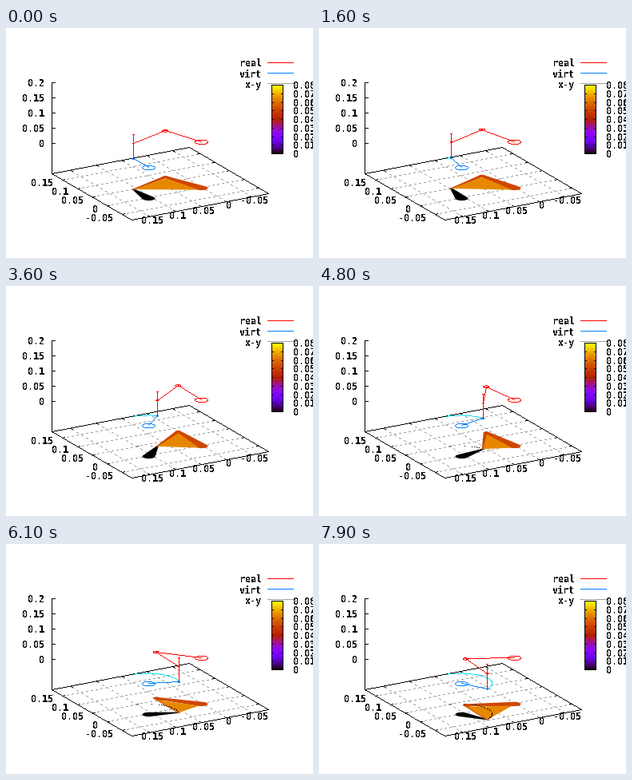
Animation, 384 px wide and 288 px high, one loop 8 s. Source, as a matplotlib script:

```python
import numpy as np
import matplotlib.pyplot as plt
from matplotlib.animation import FuncAnimation
from matplotlib.patches import PathPatch, Polygon
from matplotlib.path import Path

W, H, DPI = 384, 288, 100
PX = 72 / DPI
FRAMES, STEP = 80, 100
SQ = 2.985            # foreshortening of the ground plane
LINK = 61.2           # arm link length in px
RED, BLUE, CYAN = "#ff0000", "#0080ff", "#00e6f0"
ORANGE, RUST, GRAY = "#e78700", "#ce4600", "#a0a0a0"

plt.rcParams.update({
    "font.family": "DejaVu Sans Mono", "font.weight": "bold",
    "font.size": 11.6 * PX, "text.antialiased": False,
    "toolbar": "None",
})

fig = plt.figure(figsize=(W / DPI, H / DPI), dpi=DPI, facecolor="white")
ax = fig.add_axes([0, 0, 1, 1])
ax.axis("off")

SQUARE = np.array([(0, 0), (1, 0), (1, 1), (0, 1), (0, 0)], float)
SQUARE_CODES = [Path.MOVETO] + [Path.LINETO] * 3 + [Path.CLOSEPOLY]


def trace(pts):
    """Pixels along a polyline, one per step of the longer axis."""
    pts = np.rint(np.asarray(pts, float))
    out = [pts[:1]]
    for a, b in zip(pts[:-1], pts[1:]):
        n = int(np.abs(b - a).max())
        if n:
            s = np.arange(1, n + 1)[:, None] / n
            out.append(np.floor(a + s * (b - a) + 0.5))
    return np.vstack(out)


def squares(cells):
    """Compound path with one unit square per pixel."""
    cells = np.asarray(cells, float).reshape(-1, 2)
    if not len(cells):
        return Path(np.zeros((1, 2)))
    verts = (np.rint(cells)[:, None, :] + SQUARE).reshape(-1, 2)
    return Path(verts, SQUARE_CODES * len(cells))


def stroke(pts=(), color="black", z=3, dash=0):
    cells = trace(pts) if len(pts) else ()
    if dash:
        cells = cells[np.arange(len(cells)) % (2 * dash) < dash]
    p = PathPatch(squares(cells), facecolor=color, lw=0, snap=False, zorder=z)
    ax.add_patch(p)
    return p


def shape(color, z):
    p = Polygon([(0, 0), (0, 0), (0, 0)], closed=True, facecolor=color,
                lw=0, zorder=z)
    ax.add_patch(p)
    return p


def label(x, y, s, ha="center"):
    ax.text(x, y, s, ha=ha, va="center_baseline", zorder=9)


def move(patch, pts):
    patch.set_path(squares(trace(pts)))


def disc(c, r, n=32):
    a = np.linspace(0, 2 * np.pi, n)
    return np.column_stack([c[0] + r * np.cos(a), c[1] + r * np.sin(a) / SQ])


def capsule(a, b, ra, rb):
    """Outline around two ground discs of different radius."""
    dx, dy = b[0] - a[0], (b[1] - a[1]) * SQ
    d = max(np.hypot(dx, dy), abs(ra - rb) + 0.01)
    phi, beta = np.arctan2(dy, dx), np.arccos((ra - rb) / d)
    t1 = np.linspace(phi + beta, phi + 2 * np.pi - beta, 16)
    t2 = np.linspace(phi - beta, phi + beta, 16)
    arcs = [np.column_stack([c[0] + r * np.cos(t), c[1] + r * np.sin(t) / SQ])
            for c, r, t in ((a, ra, t1), (b, rb, t2))]
    return np.vstack(arcs)


# ---- static scene ----
LEFT, TOP = np.array([57, 182]), np.array([229, 149])
RIGHT, FRONT = np.array([328, 207]), np.array([157, 240])
GRID = 0.134 + 0.186 * np.arange(5)
TICKS = ("0.15", "0.1", "0.05", "0", "-0.05")

for f in GRID:
    for a, b, c, d in ((FRONT, RIGHT, LEFT, TOP), (LEFT, FRONT, TOP, RIGHT)):
        p, q = a + f * (b - a), c + f * (d - c)
        u = (q - p) / np.hypot(*(q - p))
        stroke([p, q], GRAY, z=1, dash=3)
        stroke([p, p + 3 * u])
        stroke([q, q - 3 * u])
stroke([LEFT, TOP, RIGHT, FRONT, LEFT], z=2)
stroke([(57, 68), LEFT])

for i, s in enumerate(TICKS):
    label(59.5 + 18.7 * i, 193.5 + 10.9 * i, s, "right")
    label(183.5 + 31.7 * i, 240 - 6.2 * i, s)

for i, s in enumerate(("0.2", "0.15", "0.1", "0.05", "0")):
    y = 68 + 19.1 * i
    stroke([(57, y), (61, y)])
    label(48.5, y, s, "right")

for y, s, c in ((43, "real", RED), (56, "virt", BLUE), (69, "x-y", GRAY)):
    label(320, y + 0.5, s, "right")
    stroke([(327, y), (359, y)], c)

g = np.linspace(0, 1, 86)
ramp = np.column_stack([np.sqrt(g), g ** 3,
                        np.clip(np.sin(2 * np.pi * g), 0, 1)])
ax.imshow(ramp[:, None, :], extent=(332, 346, 158, 72), origin="lower",
          aspect="auto", interpolation="nearest", zorder=2)
ax.set_xlim(0, W)
ax.set_ylim(H, 0)
stroke([(332, 71), (346, 71), (346, 157), (332, 157), (332, 71)], z=4)
for i in range(9):
    y = 157 - 10.72 * i
    stroke([(332, y), (334, y)])
    stroke([(344, y), (346, y)])
    label(359, y, f"{i / 100:g}", "left")

# ---- motion of the tool point ----
KT = np.array([0, 1.0, 1.6, 2.0, 3.6, 4.8, 5.5, 6.8, 7.9])
KX = np.array([159, 161.2, 165, 168.7, 188.7, 205, 212.7, 215.7, 210.3])
KY = np.array([163.2, 162.5, 162.1, 161.8, 162, 165.2, 168.8, 176, 181])


def hermite(t, ys):
    i = np.clip(np.searchsorted(KT, t, side="right") - 1, 0, len(KT) - 2)
    m = np.gradient(ys, KT)
    h = KT[i + 1] - KT[i]
    s = (t - KT[i]) / h
    return ((1 + 2 * s) * (1 - s) ** 2 * ys[i] + s * (1 - s) ** 2 * h * m[i]
            + s * s * (3 - 2 * s) * ys[i + 1] + s * s * (s - 1) * h * m[i + 1])


def path(t):
    return np.column_stack([hermite(t, KX), hermite(t, KY)])


def elbow(s, w):
    """Far meeting point of the two equal links."""
    d = (w - s) * (1, SQ)
    n = np.hypot(*d)
    h = np.sqrt(LINK ** 2 - (n / 2) ** 2)
    perp = np.array([-d[1], d[0]]) / n
    return (s + w) / 2 + perp * h / (1, SQ)


SHOULDER = np.array([244.0, 142.3])
VIRT = np.array([178.0, 174.5])
LIFT = np.array([0, 19.2])     # height of the arm above the x-y plane
DROP = np.array([0, 38.4])     # x-y plane to the floor

dark = shape("black", 4)
upper, lower = shape(RUST, 5), shape(RUST, 5)
fill = shape(ORANGE, 6)
dots = stroke(z=7)
trail = stroke(color=CYAN, z=7)
virt = stroke(color=BLUE, z=8)
vtip = stroke(color=BLUE, z=8)
pole = stroke(color=RED, z=8)
arm = stroke(color=RED, z=8)
ering = stroke(color=RED, z=8)
wring = stroke(color=RED, z=8)
cap = stroke(color=RED, z=8)
stroke(disc(VIRT, 8), BLUE, z=8)
stroke(disc(SHOULDER, 8), RED, z=8)


def draw(frame):
    t = 0 if frame < 2 else frame * STEP / 1000
    ts = np.arange(0, t + 0.05, 0.1)
    run = path(ts)
    p = run[-1]
    w = p - LIFT
    e = elbow(SHOULDER, w)
    fw, fe, fs = (q + LIFT + DROP for q in (w, e, SHOULDER))

    dark.set_xy(capsule(fw, VIRT + DROP, 1.5, 8) + 0.5)
    upper.set_xy(capsule(fe, fs, 3.6, 8) + 0.5)
    lower.set_xy(capsule(fw, fe, 1.7, 3.6) + 0.5)
    fill.set_xy(np.array([fw, fe + (0.5, 2), fs + (-3, 2.2)]) + 0.5)

    # floor dots: sparse on the slow part, dense later
    k = np.arange(len(ts))
    keep = (ts < t - 0.25) & np.where(ts > 3.8, k % 3 > 0, k % 15 == 1)
    dots.set_path(squares((run + DROP)[keep & (ts > 1)]))

    move(trail, run)
    move(virt, [p, VIRT])
    move(vtip, disc(p, 1.5))
    move(pole, [p, p - (0, 30.5)])
    move(arm, [w, e, SHOULDER])
    move(ering, disc(e, 3.4))
    move(wring, disc(w, 1.5))
    move(cap, [p - (1, 30.5), p + (1, -30.5)])
    return (dark, upper, lower, fill, dots, trail, virt, vtip, pole, arm,
            ering, wring, cap)


anim = FuncAnimation(fig, draw, frames=FRAMES, interval=STEP, repeat=True,
                     repeat_delay=0, blit=False)
plt.show()
```
